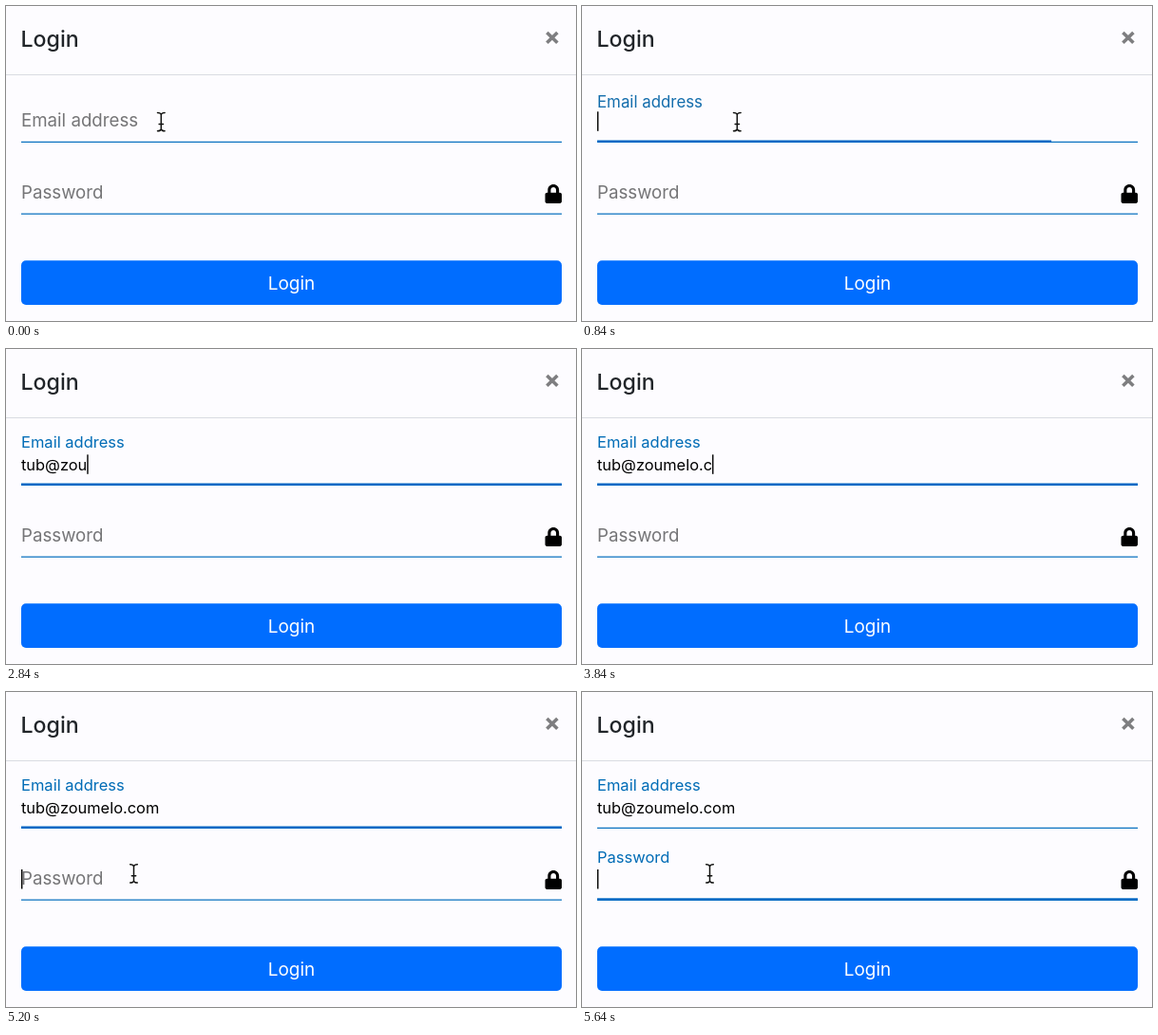
An HTML page for the animation above (5.8 s loop, 600 by 332 pixels).

```html
<!DOCTYPE html>
<html lang="en">
<head>
<meta charset="utf-8">
<title>Login form</title>
<style>
  html, body { margin: 0; width: 100%; height: 100%; overflow: hidden; background: #fdfcff; }
  svg { display: block; width: 600px; height: 332px; font-family: Inter, Roboto, sans-serif; }
  .thin { stroke: #0a72c0; stroke-width: 1.3; }
  .thick { fill: #0068c4; }
  .rest { font-size: 18.7px; }
</style>
</head>
<body>
<svg viewBox="0 0 600 332">
  <rect width="600" height="332" fill="#fdfcff"/>
  <text x="15.5" y="43" font-size="23.2" font-weight="500" fill="#212529">Login</text>
  <path d="M569.4 28l11 10.8m0-10.8l-11 10.8" stroke="#7e7e80" stroke-width="3.6"/>
  <path d="M0 72.5H600" stroke="#d9dce1"/>

  <path class="thin" d="M16 143.3H585M16 219.2H585"/>
  <rect id="emailBar" class="thick" x="16" y="141.5" height="2.5"/>
  <rect id="passBar" class="thick" x="16" y="217.3" height="2.5"/>
  <text id="emailLabel" x="16">Email address</text>
  <text id="passLabel" x="16">Password</text>
  <text id="typed" x="16" y="128" font-size="16.4"></text>

  <path transform="translate(567.5 188) scale(.039)" d="M400 224h-24v-72C376 68.2 307.8 0 224 0S72 68.2 72 152v72H48c-26.5 0-48 21.5-48 48v192c0 26.5 21.5 48 48 48h352c26.5 0 48-21.5 48-48V272c0-26.5-21.5-48-48-48zm-104 0H152v-72c0-39.7 32.3-72 72-72s72 32.3 72 72v72z"/>
  <rect x="16" y="268.3" width="569" height="46.7" rx="5" fill="#006dff"/>
  <text x="300.5" y="299" font-size="19" fill="#fff" text-anchor="middle">Login</text>

  <rect id="caret" width="1.4" height="20.5"/>
  <g id="pointer" fill="none" stroke-linecap="round">
    <path id="beam" d="M-3.8-9.6Q-.6-9.6 0-7.6Q.6-9.6 3.8-9.6M0-7.6V7.8M-3.8 9.8Q-.6 9.8 0 7.8Q.6 9.8 3.8 9.8M-2.2 2.4H2.2" stroke="#fff" stroke-width="3"/>
    <use href="#beam"/>
  </g>
</svg>
<script>
const LOOP = 5800, STEP = 40, FLOAT = 400;
const EMAIL_FOCUS = 680, PASS_FOCUS = 5200, POINTER_BACK = 4680;
const address = "tub@zoumelo.com";
const keyTimes = [1200, 1320, 1400, 2280, 2520, 2680, 2840, 2920, 3040, 3200, 3480, 3600, 3840, 3960, 4080];
const caretGaps = [[1800, 2280], [4640, PASS_FOCUS]];

const el = id => document.getElementById(id);
const set = (id, attrs) => { for (const k in attrs) el(id).setAttribute(k, attrs[k]); };
const clamp = x => Math.min(1, Math.max(0, x));
const mix = (a, b, p) => a + (b - a) * p;

// cubic-bezier(.25, .8, .25, 1)
function ease(x) {
  if (x <= 0 || x >= 1) return clamp(x);
  let lo = 0, hi = 1, s;
  for (let i = 0; i < 24; i++) {
    s = (lo + hi) / 2;
    if (.75 * s * (1 - s) + s ** 3 < x) lo = s; else hi = s;
  }
  return 2.4 * s * (1 - s) ** 2 + 3 * s * s * (1 - s) + s ** 3;
}

function drawLabel(id, y, lift, p) {
  const rgb = [mix(117, 0, p), mix(117, 108, p), mix(119, 182, p)].map(Math.round);
  set(id, { y: y - lift * p, "font-size": mix(18.7, 16.5, p), fill: `rgb(${rgb})` });
}

function draw(t) {
  const email = ease((t - EMAIL_FOCUS - 20) / FLOAT);
  const pass = ease((t - PASS_FOCUS - 20) / FLOAT);
  drawLabel("emailLabel", 127, 23.3, email);
  drawLabel("passLabel", 202.8, 23.3, pass);
  set("emailBar", { width: 569 * email * (1 - pass) });
  set("passBar", { width: 569 * pass });

  const count = keyTimes.filter(k => k <= t).length;
  el("typed").textContent = address.slice(0, count);

  const inPass = t >= PASS_FOCUS;
  const shown = t >= EMAIL_FOCUS && !caretGaps.some(([a, b]) => t >= a && t < b);
  const end = count && !inPass ? el("typed").getComputedTextLength() : 0;
  set("caret", { x: 16 + end, y: inPass ? 187 : 111.3, opacity: +shown });

  const m = clamp((t - POINTER_BACK) / 420), glide = m * m * (3 - 2 * m);
  set("pointer", {
    transform: `translate(${mix(163.3, 134.5, glide)} ${mix(122, 191.3, glide)})`,
    opacity: +(t < keyTimes[0] || t >= POINTER_BACK)
  });
}

el("pointer").lastElementChild.remove();
const ink = el("beam").cloneNode();
ink.removeAttribute("id");
ink.setAttribute("stroke", "#111");
ink.setAttribute("stroke-width", "1.5");
el("pointer").append(ink);

const start = performance.now();
function frame() {
  const t = (performance.now() - start) % LOOP;
  draw(Math.floor(t / STEP) * STEP);
  requestAnimationFrame(frame);
}
frame();
</script>
</body>
</html>
```
